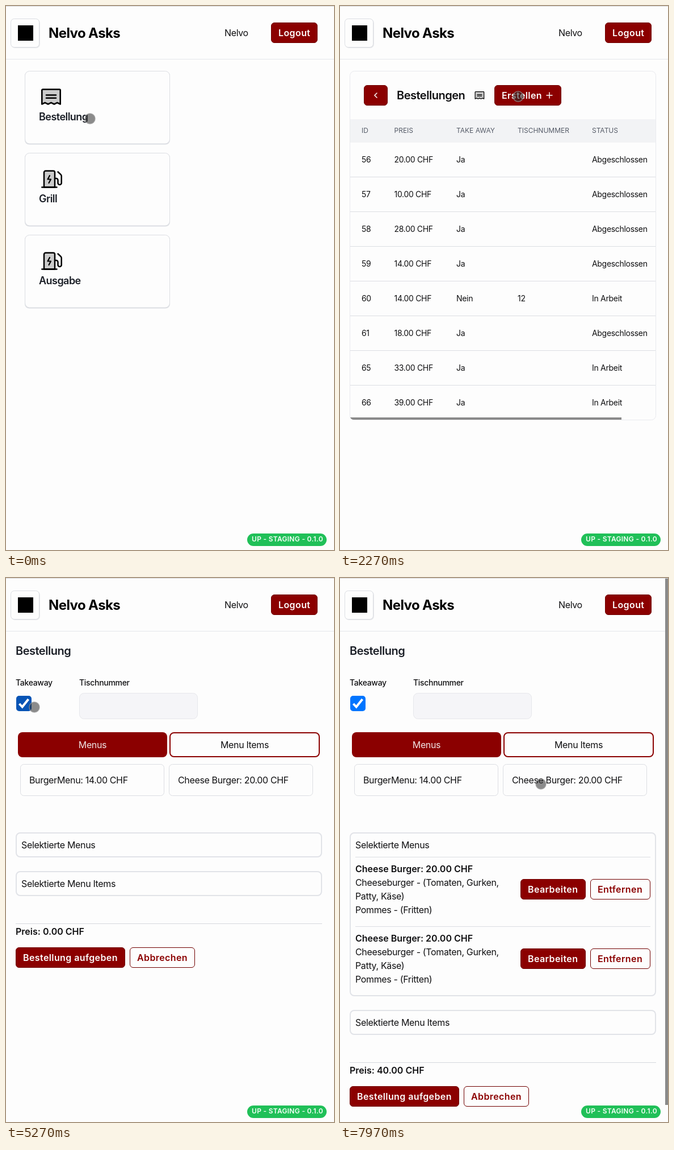
Write an HTML page that moves like this. It is 578 by 956 pixels and loops after 8 s.

```html
<!DOCTYPE html>
<html lang="de">
<head>
<meta charset="utf-8">
<title>Bestellung</title>
<style>
  html, body { margin: 0; width: 100%; height: 100%; overflow: hidden; background: #fdfdfd; }
  svg { display: block; width: 578px; height: 956px; }
  text { font-family: Inter, "Noto Sans", sans-serif; font-optical-sizing: none; white-space: pre; }
</style>
</head>
<body>
<svg id="stage" viewBox="0 0 578 956" fill="none"></svg>
<script>
const LOOP = 8000;
const RED = '#8b0000', RIM = '#700000', PAPER = '#fdfdfd', INK = '#101012', HEADING = '#1b1f27';
const EDGE = '#dcdee3', SOFT = '#e9eaee', SHADE = '#f2f3f5', GREY = '#8a8a8a';
const ITEM_HEIGHT = 122;
const stage = document.getElementById('stage');

function add(parent, tag, attrs, content) {
  const node = document.createElementNS('http://www.w3.org/2000/svg', tag);
  for (const key in attrs) node.setAttribute(key, attrs[key]);
  if (content) node.textContent = content;
  return parent.appendChild(node);
}
const group = parent => add(parent, 'g', {});
const path = (parent, d, attrs) => add(parent, 'path', { d, ...attrs });
const line = (parent, x1, x2, y, stroke = EDGE) => path(parent, `M${x1} ${y}H${x2}`, { stroke });
const box = (parent, x, y, width, height, rx, attrs) =>
  add(parent, 'rect', { x, y, width, height, rx, ...attrs });

// Outline drawn inside the given outer box.
function frame(parent, x, y, w, h, rx, stroke = EDGE, weight = 1, fill = 'none') {
  return box(parent, x + weight / 2, y + weight / 2, w - weight, h - weight, rx,
    { stroke, 'stroke-width': weight, fill });
}

// Light body text is set slightly tighter than bold text and small caps.
const tracking = (size, weight) => weight < 600 && size > 12 ? -.022 : 0;

function text(parent, x, y, content, size = 16, weight = 400, fill = INK,
    spacing = tracking(size, weight), anchor = 'start') {
  return add(parent, 'text', {
    x, y, fill, 'font-size': size, 'font-weight': weight,
    'letter-spacing': spacing + 'em', 'text-anchor': anchor
  }, content);
}
const centered = (parent, x, y, content, fill) =>
  text(parent, x, y, content, 16, 400, fill, undefined, 'middle');

function button(parent, x, y, w, label, solid = true) {
  frame(parent, x, y, w, 36, 5.5, RIM, 1, solid ? RED : 'none');
  text(parent, x + 13, y + 23.5, label, 16, 600, solid ? PAPER : RED, .025);
}

function receipt(parent, x, y, scale) {
  const icon = add(parent, 'g', {
    transform: `translate(${x} ${y}) scale(${scale})`, stroke: '#000',
    'stroke-width': 2.6, 'stroke-linejoin': 'round', 'stroke-linecap': 'round'
  });
  path(icon, 'M1.3 27.5V3a1.5 1.5 0 0 1 1.5-1.5H32.2a1.5 1.5 0 0 1 1.5 1.5V27.5l-5.4-2.7-5.4 2.7-5.4-2.7-5.4 2.7-5.4-2.7Z',
    { fill: '#cbcbcb' });
  path(icon, 'M9 11.5H26M9 16.7H26');
}
function pump(parent, x, y) {
  const icon = add(parent, 'g', {
    transform: `translate(${x} ${y})`, stroke: '#000',
    'stroke-width': 2.5, 'stroke-linejoin': 'round', 'stroke-linecap': 'round'
  });
  path(icon, 'M5 30V4a2.7 2.7 0 0 1 2.7-2.7H21.3A2.7 2.7 0 0 1 24 4V30Z', { fill: '#cbcbcb' });
  path(icon, 'M1.3 30H27.5M24 14.5h2.5a3 3 0 0 1 3 3v5a3.1 3.1 0 0 0 6.2 0V10.5a4 4 0 0 0-1.2-2.8L29.5 3');
  path(icon, 'M15 9.5l-3.5 6.5h5.5l-3.5 6.5', { 'stroke-width': 2.2 });
}

function buildHeader() {
  line(stage, 0, 578, .5, '#d8d8da');
  line(stage, 0, 578, 93.5, '#e5e7eb');
  box(stage, 9, 23, 51, 51, 7, { fill: '#e6e7ea' });
  frame(stage, 8, 22, 51, 51, 6, EDGE, 1, PAPER);
  box(stage, 21, 34, 27, 27, 0, { fill: '#000' });
  text(stage, 75, 56, 'Nelvo Asks', 24, 700, '#000', -.025);
  text(stage, 385, 53, 'Nelvo');
  button(stage, 467, 29, 82, 'Logout');
}

function buildHome() {
  const view = group(stage);
  ['Bestellung', 'Grill', 'Ausgabe'].forEach((label, i) => {
    const y = 114 + i * 144;
    box(view, 33, y + 1, 256, 128.5, 8, { fill: EDGE });
    frame(view, 33, y, 256, 128.5, 8, EDGE, 1, PAPER);
    if (i) pump(view, 62, y + 30.5);
    else receipt(view, 62, y + 31, 1);
    text(view, 58, y + 87, label, 18, 600, HEADING, -.03);
  });
  return view;
}

const columns = ['ID', 'PREIS', 'TAKE AWAY', 'TISCHNUMMER', 'STATUS'];
function tableHead(parent, xs, height) {
  frame(parent, 17, 114, 540, height, 8, SOFT);
  box(parent, 18, 199, 538, 41, 0, { fill: SHADE });
  columns.forEach((name, i) => text(parent, xs[i], 223, name, 12, 400, '#565c68'));
}

function buildOrders() {
  const view = group(stage), empty = group(view), filled = group(view);
  tableHead(empty, [38, 143, 223.5, 340, 481], 171);
  text(empty, 42, 267, 'No Items', 14);

  const xs = [38, 95.5, 205, 313, 444];
  tableHead(filled, xs, 614);
  const orders = [[56, 20], [57, 10], [58, 28], [59, 14], [60, 14, 12], [61, 18], [65, 33], [66, 39]];
  const open = [60, 65, 66];
  orders.forEach(([id, price, table], i) => {
    const y = 275 + i * 61;
    const cells = [id, price + '.00 CHF', table ? 'Nein' : 'Ja', table || '',
      open.includes(id) ? 'In Arbeit' : 'Abgeschlossen'];
    cells.forEach((cell, c) => text(filled, xs[c], y, String(cell), 14));
    if (i < 7) line(filled, 18, 556, y + 25.5);
  });
  path(filled, 'M18 723H496V727H24Q20 727 18 723Z', { fill: GREY });

  const stroke = { stroke: PAPER, 'stroke-width': 1.5, 'stroke-linecap': 'round' };
  button(view, 42, 139, 42, '');
  path(view, 'M65 153l-4 4 4 4', stroke);
  text(view, 100, 164, 'Bestellungen', 20, 600, INK, -.025);
  receipt(view, 237.5, 150, .48);
  button(view, 272, 139, 118, 'Erstellen');
  path(view, 'M364 157H374M369 152V162', stroke);
  return { view, empty, filled };
}

function buildItem(parent, index) {
  const item = add(parent, 'g', { transform: `translate(0 ${index * ITEM_HEIGHT})` });
  line(item, 27, 547, 490.5);
  text(item, 27, 517, 'Cheese Burger: 20.00 CHF', 16, 600);
  ['Cheeseburger - (Tomaten, Gurken,', 'Patty, Käse)', 'Pommes - (Fritten)']
    .forEach((row, i) => text(item, 27, 541 + i * 24, row));
  button(item, 318, 529, 115, 'Bearbeiten');
  button(item, 441, 529, 106, 'Entfernen', false);
  return item;
}

function buildForm() {
  const view = group(stage);
  text(view, 17, 135, 'Bestellung', 20, 600, HEADING, -.025);
  text(view, 17, 189, 'Takeaway', 14, 500);
  text(view, 129, 189, 'Tischnummer', 14, 500);
  const input = frame(view, 129, 202, 209, 46, 8);
  const check = frame(view, 18, 207, 27, 27, 4, '#767676', 2);
  const tick = path(view, 'M23.5 221l5.2 5.5L39.5 213', { stroke: '#fff', 'stroke-width': 4 });

  box(view, 21, 271, 263, 44, 8, { fill: RED });
  centered(view, 152.5, 299, 'Menus', '#f0e6e6');
  frame(view, 288, 271, 265, 44, 7, RED, 2);
  centered(view, 420.5, 299, 'Menu Items', INK);
  frame(view, 25, 327, 254, 56, 6);
  text(view, 41, 361, 'BurgerMenu: 14.00 CHF');
  frame(view, 287, 327, 254, 56, 6);
  text(view, 303, 361, 'Cheese Burger: 20.00 CHF');

  const selected = frame(view, 17, 447, 540, 44, 7, '#e1e3e8', 2);
  text(view, 27, 475, 'Selektierte Menus');
  const items = [0, 1].map(i => buildItem(view, i));

  const lower = group(view);
  frame(lower, 17, 515, 540, 44, 7, '#e1e3e8', 2);
  text(lower, 27, 543, 'Selektierte Menu Items');
  line(lower, 17, 557, 607.5, '#d5d8de');
  const price = text(lower, 17, 627, 'Preis: 0.00 CHF', 16, 600);
  button(lower, 17, 649, 193, 'Bestellung aufgeben');
  button(lower, 218, 649, 115, 'Abbrechen', false);
  return { view, input, check, tick, selected, items, lower, price };
}

buildHeader();
const home = buildHome();
const orders = buildOrders();
const form = buildForm();
const scrollbar = box(stage, 573, 1, 5, 925, 0, { fill: GREY });
box(stage, 425, 927, 140, 22, 11, { fill: '#20c058' });
text(stage, 433, 941, 'UP - STAGING - 0.1.0', 12, 600, '#f4fff7', .025);
const pointer = add(stage, 'circle', {
  r: 9, fill: 'rgba(45,45,45,.55)', stroke: 'rgba(150,150,150,.7)', 'stroke-width': 1.5
});

// time, x, y
const route = [
  [0, 148, 198], [130, 148, 198], [500, 147, 193], [1200, 147, 193],
  [2100, 314, 159], [2700, 314, 159], [3370, 288, 164], [4400, 50, 227],
  [5300, 50, 227], [6100, 353, 358], [6800, 353, 358], [7400, 354, 362], [LOOP, 354, 362]
];
function pointerAt(t) {
  const i = route.findIndex(stop => stop[0] > t);
  const [t0, x0, y0] = route[i - 1], [t1, x1, y1] = route[i];
  const p = (t - t0) / (t1 - t0), k = p * p * (3 - 2 * p);
  return [x0 + (x1 - x0) * k, y0 + (y1 - y0) * k];
}

function set(node, attrs) {
  for (const key in attrs) node.setAttribute(key, attrs[key]);
}
function show(node, visible) {
  node.style.display = visible ? '' : 'none';
}

function render(t) {
  const [x, y] = pointerAt(t);
  set(pointer, { cx: x, cy: y });

  show(home, t < 900);
  show(orders.view, t >= 900 && t < 2600);
  show(orders.empty, t < 1200);
  show(orders.filled, t >= 1200);
  show(form.view, t >= 2600);

  const checked = t >= 4700;
  const hovered = x < 56 && y < 236;
  const blue = hovered ? '#0754b5' : '#0075ff';
  set(form.check, { fill: checked ? blue : 'none', stroke: checked ? blue : '#767676' });
  show(form.tick, checked);
  set(form.input, { fill: checked ? '#f5f5f8' : 'none', stroke: checked ? '#e6e7eb' : '#e3e4e8' });

  const count = (t >= 6300) + (t >= 7500);
  form.items.forEach((item, i) => show(item, i < count));
  set(form.selected, { height: 42 + count * ITEM_HEIGHT });
  set(form.lower, { transform: `translate(0 ${count * ITEM_HEIGHT})` });
  form.price.textContent = `Preis: ${count * 20}.00 CHF`;
  show(scrollbar, t >= 7570);
}

const start = performance.now();
function tick() {
  render((performance.now() - start) % LOOP);
  requestAnimationFrame(tick);
}
tick();
</script>
</body>
</html>
```
